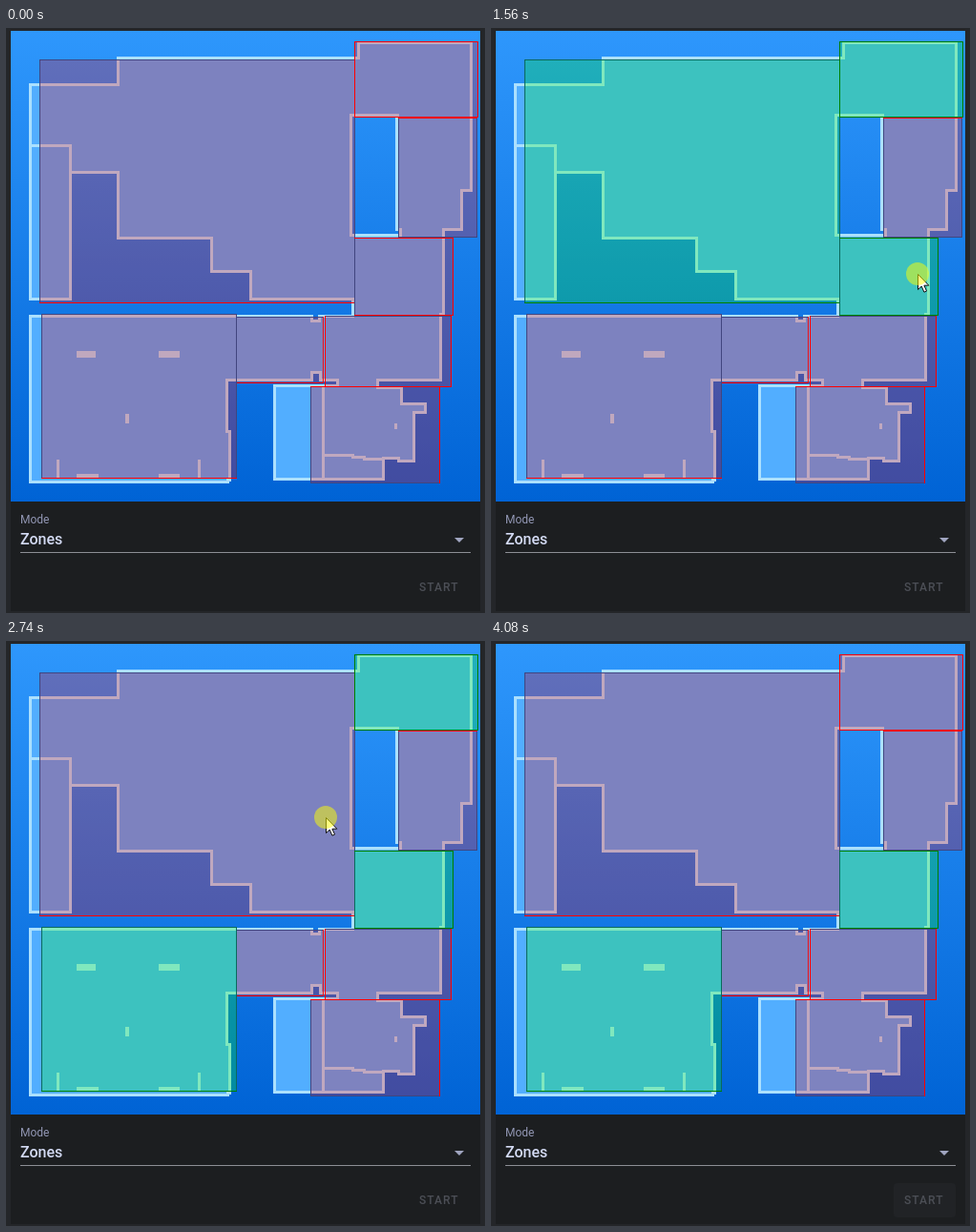
Animation, 502 px wide and 614 px high, one loop 4.71 s. Source, as an HTML page:

```html
<!DOCTYPE html>
<html lang="en">
<head>
<meta charset="utf-8">
<title>Zone selection</title>
<style>
  html, body { margin: 0; width: 100%; height: 100%; overflow: hidden; background: #242629; }
  svg { position: absolute; left: 0; top: 0; display: block; }
  text { font-family: Roboto, Arial, sans-serif; }
  .wall { fill: none; stroke: #abe0fe; stroke-width: 3; }
  .block { fill: #abe0fe; }
  .zones, .crisp { shape-rendering: crispEdges; }
</style>
</head>
<body>
<svg width="502" height="614" viewBox="0 0 502 614">
  <defs>
    <linearGradient id="sea" x1="0" y1="0" x2="0" y2="1">
      <stop offset="0" stop-color="#2e97fc"/>
      <stop offset="1" stop-color="#0063d5"/>
    </linearGradient>
  </defs>
  <rect x="5" y="3" width="492" height="609" fill="#1c1e20"/>
  <rect x="5" y="3" width="492" height="494" fill="url(#sea)"/>

  <g class="crisp">
    <path class="wall" style="fill:#52aeff" fill-rule="evenodd" d="M25.5 59.5H117.5V31.5H369.5V15.5H487.5V170.5H477.5V211.5H458.5V300.5H455.5V369.5H389.5V377.5H414.5V394.5H439.5V403.5H427.5V454.5H411.5V451.5H395.5V473.5H281.5V375.5H347.5V369.5H329.5V361.5H320.5V369.5H231.5V423.5H234.5V474.5H232.5V476.5H25.5V302.5H320.5V307.5H328.5V302.5H363.5V284.5H256.5V255.5H215.5V220.5H117.5V151.5H67.5V284.5H25.5Z M361.5 91.5H410.5V95.5H409.5V211.5H413.5V217.5H361.5Z"/>
    <path class="wall" d="M25.5 123.5H67.5V152M332.5 376V474M332.5 448.5H363V450.5H375V452.5H396"/>
    <g id="blocks" class="block"></g>
  </g>

  <g id="zones" class="zones"></g>

  <text x="15" y="520" font-size="12" fill="#9297b4">Mode</text>
  <text x="15" y="542" font-size="16" font-weight="500" fill="#d3daf3">Zones</text>
  <rect class="crisp" x="15" y="550" width="472" height="1" fill="#8d8f95"/>
  <path d="M470 535H480L475 540Z" fill="#a0a5c0"/>
  <rect id="hover" x="422" y="569" width="65" height="36" rx="4" fill="#212326" opacity="0"/>
  <text x="433" y="591" font-size="12" font-weight="500" letter-spacing="1.07" fill="#4c4f56">START</text>

  <g id="cursor" opacity="0">
    <path d="M.5 .5V16.6L4.2 13.1L6.9 19.2L9.5 18.1L6.9 12.2H11.8Z" fill="#fff" stroke="#111" stroke-width="1"/>
    <circle id="press" r="12" fill="#ff0" fill-opacity=".5" opacity="0"/>
  </g>
</svg>
<script>
const LOOP = 4710;
const NS = 'http://www.w3.org/2000/svg';
const $ = id => document.getElementById(id);

function add(parent, tag, attrs = {}) {
  const el = document.createElementNS(NS, tag);
  for (const k in attrs) el.setAttribute(k, attrs[k]);
  return parent.appendChild(el);
}

function play(el, frames) {
  el.animate(frames, { duration: LOOP, iterations: Infinity });
}

// Shows an element only within the given [from, to] spans.
function showDuring(el, spans) {
  const frames = [{ offset: 0, opacity: 0, easing: 'step-end' }];
  for (const [from, to] of spans) {
    if (from === 0) frames[0].opacity = 1;
    else frames.push({ offset: from / LOOP, opacity: 1, easing: 'step-end' });
    if (to < LOOP) frames.push({ offset: to / LOOP, opacity: 0, easing: 'step-end' });
  }
  const last = spans[spans.length - 1][1] === LOOP ? 1 : 0;
  frames.push({ offset: 1, opacity: last });
  play(el, frames);
}

[[74, 339, 20, 7], [160, 339, 22, 7], [125, 405, 4, 10], [53, 453, 3, 20],
 [201, 453, 3, 19], [74, 468, 23, 5], [160, 468, 22, 5], [407, 415, 3, 6]]
  .forEach(([x, y, width, height]) => add($('blocks'), 'rect', { x, y, width, height }));

// Box corners, sides drawn bright, and the spans in which the zone is selected.
const ZONES = [
  [35, 33, 365, 288, 'b', [[360, 2740]]],
  [411, 94, 493, 219, 't', []],
  [365, 14, 494, 93, 'trbl', [[830, 3480]]],
  [365, 220, 468, 301, 'trb', [[1560, LOOP]]],
  [241, 303, 332, 372, 'rb', []],
  [334, 302, 466, 376, 'rbl', []],
  [319, 376, 454, 477, 'tr', []],
  [37, 300, 241, 472, 'b', [[2190, LOOP]]]
];

function drawZone([x1, y1, x2, y2, bright], fill, line, dim) {
  const g = add($('zones'), 'g');
  const w = x2 - x1 + 1, h = y2 - y1 + 1;
  add(g, 'rect', { x: x1, y: y1, width: w, height: h, fill, 'fill-opacity': .25 });
  const sides = { t: [x1, y1, w, 1], r: [x2, y1, 1, h], b: [x1, y2, w, 1], l: [x1, y1, 1, h] };
  const order = Object.keys(sides).sort((a, b) => bright.includes(a) - bright.includes(b));
  for (const s of order) {
    const [x, y, width, height] = sides[s];
    add(g, 'rect', { x, y, width, height, fill: bright.includes(s) ? line : dim });
  }
  return g;
}

for (const zone of ZONES) {
  const on = zone[5];
  const idle = drawZone(zone, '#f00', '#f00', '#41457f');
  if (!on.length) continue;
  const [from, to] = on[0];
  showDuring(idle, to < LOOP ? [[0, from], [to, LOOP]] : [[0, from]]);
  showDuring(drawZone(zone, '#0f0', '#008000', '#0a6a5c'), on);
}

// Pointer moves: start, end, number of jumps, target x and y.
const MOVES = [
  [40, 310, 6, 281, 216],
  [430, 560, 3, 361, 168],
  [590, 780, 4, 411, 86],
  [1060, 1260, 5, 447, 258],
  [1640, 1740, 2, 415, 278],
  [1780, 1900, 3, 270, 332],
  [1950, 2020, 2, 225, 341],
  [2260, 2360, 2, 246, 325],
  [2400, 2560, 4, 337, 215],
  [2620, 2710, 2, 335, 185],
  [2800, 2900, 2, 350, 165],
  [2940, 3200, 5, 405, 92],
  [3300, 3400, 3, 415, 70],
  [3540, 3600, 2, 424, 130],
  [3640, 3770, 3, 440, 355],
  [3840, 4040, 4, 448, 612]
];

let x = 414, y = 580;
const place = () => `translate(${x}px, ${y}px)`;
const path = [{ offset: 0, transform: place() }];
for (const [from, to, jumps, nx, ny] of MOVES) {
  path.push({ offset: from / LOOP, transform: place(), easing: `steps(${jumps - 1}, jump-both)` });
  x = nx;
  y = ny;
  path.push({ offset: to / LOOP, transform: place() });
}
path.push({ offset: 1, transform: place() });
play($('cursor'), path);

showDuring($('cursor'), [[40, 4080]]);
showDuring($('press'), [[360, 430], [830, 900], [1560, 1630], [2190, 2260], [2740, 2800], [3480, 3540]]);
showDuring($('hover'), [[3980, LOOP]]);
</script>
</body>
</html>
```
